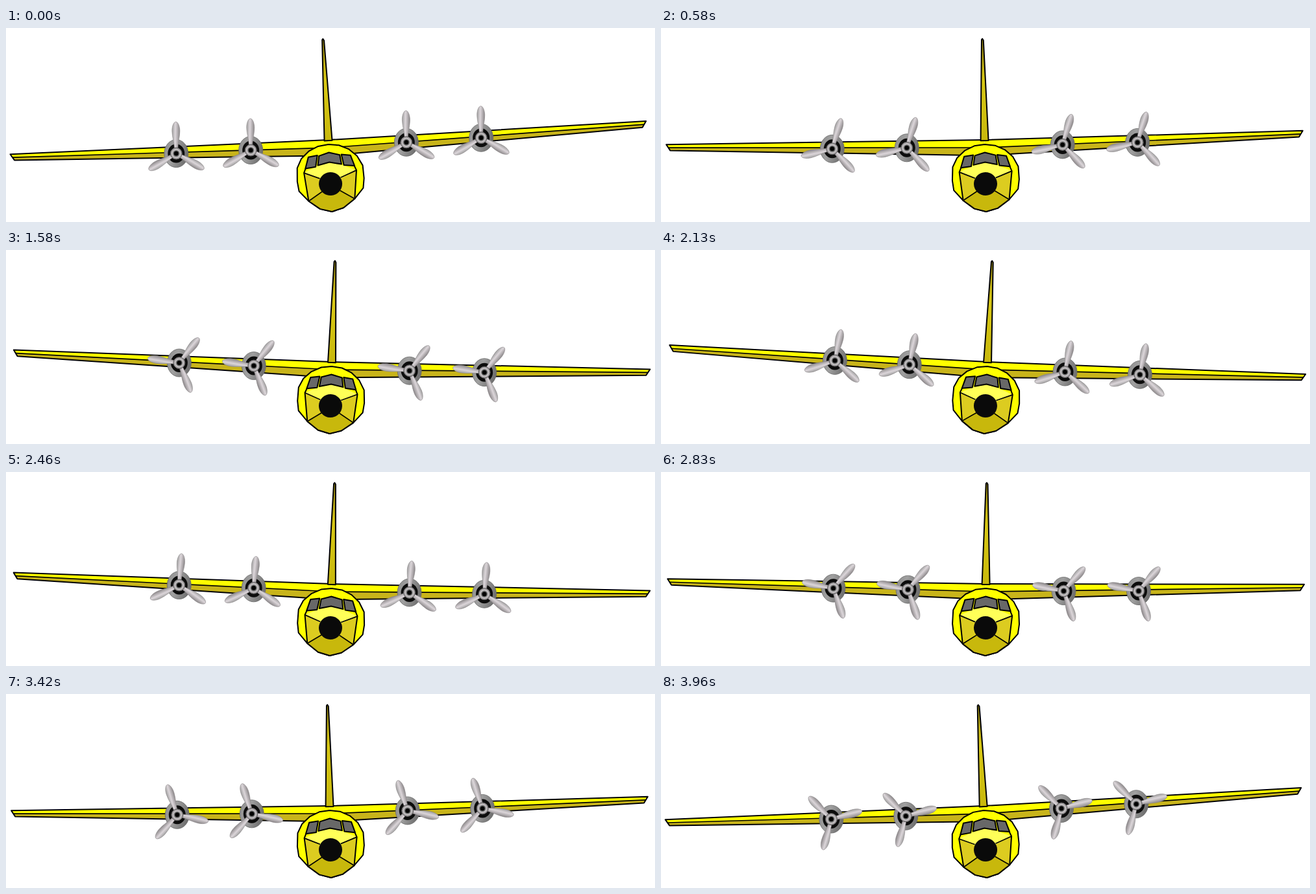
An HTML page that plays this animation: 1000x300 px, repeating every 4 s.

```html
<!DOCTYPE html>
<html lang="en">
<head>
<meta charset="utf-8">
<title>Rocking propeller plane</title>
<style>
  html, body { margin: 0; width: 100%; height: 100%; overflow: hidden; background: #fff; }
  svg { display: block; width: 100%; height: 100%; }
  .ink { stroke: #000; stroke-width: 2; stroke-linejoin: round; }
  .line { fill: none; stroke: #000; stroke-width: 1.7; }
</style>
</head>
<body>
<svg viewBox="0 0 1000 300">
  <defs>
    <linearGradient id="steel" x1="0" x2="1" y1="0" y2="0.3">
      <stop offset="0" stop-color="#8c8c8c"/>
      <stop offset="0.45" stop-color="#a0a0a0"/>
      <stop offset="1" stop-color="#727272"/>
    </linearGradient>
    <linearGradient id="metal" x1="0" x2="1" y1="0" y2="0.1">
      <stop offset="0" stop-color="#9c9c9c"/>
      <stop offset="0.45" stop-color="#dcd6da"/>
      <stop offset="1" stop-color="#8e8a8c"/>
    </linearGradient>
    <linearGradient id="finFill" x1="0" x2="0" y1="0" y2="1">
      <stop offset="0" stop-color="#9c8c10"/>
      <stop offset="0.4" stop-color="#d8c814"/>
      <stop offset="1" stop-color="#c8b80c"/>
    </linearGradient>

    <path id="blade" fill="url(#metal)" stroke="#8a8688" stroke-width="0.6"
          d="M-2.5-5C-2.5-16-6-25-6-35C-6-43-3-49 0-49C3-49 6-43 6-35C6-25 2.5-16 2.5-5Z"/>

    <g id="engine">
      <ellipse rx="18.5" ry="21.5" fill="url(#steel)" stroke="#666" stroke-width="0.8"/>
      <ellipse rx="13" ry="14.5" fill="#0c0c0c"/>
      <g id="prop">
        <use href="#blade"/>
        <use href="#blade" transform="rotate(120)"/>
        <use href="#blade" transform="rotate(240)"/>
      </g>
      <circle r="9" fill="#a8a4a6" stroke="#555" stroke-width="1"/>
      <circle r="6" fill="#777" stroke="#d4d0d2" stroke-width="1.2"/>
      <circle r="3.5" fill="#000"/>
    </g>

    <g id="wing">
      <path fill="#ffff00" d="M0 173L490.5 169.5L487 174.5L0 185Z"/>
      <path fill="#c8b41a" d="M0 185L487 174.5L484.5 179L45 195.5L0 198Z"/>
      <path class="line" d="M0 185L487 174.5"/>
      <path class="ink" fill="none" d="M0 173L490.5 169.5L484.5 179L45 195.5L0 198"/>
    </g>
  </defs>

  <g id="plane">
    <use href="#wing" transform="translate(500)"/>
    <use href="#wing" transform="translate(500) scale(-1 1)"/>
    <path class="ink" fill="url(#finFill)" d="M494 174L498.8 18L500 16.5L501.6 19L506 174Z"/>

    <path class="ink" fill="#ffff00"
          d="M500 180L516 182L531 189L543 200L551 215L552 235L550 250L536 266L518 279L500 284L482 279L465 266L451 250L449 235L450 214L457 200L469 189L484 182Z"/>
    <path fill="#c8b80c" d="M465 266L500 241L536 266L518 279L500 284L482 279Z"/>
    <path fill="#dccc20" d="M460 222L500 241L465 266ZM541 222L500 241L536 266Z"/>
    <path fill="#ffff58" d="M460 222L480 213L500 208L520 213L541 222L500 241Z"/>
    <path class="ink" fill="none"
          d="M463 215L460 222L465 266L482 279L500 284L518 279L536 266L541 222L538 215"/>
    <path class="line" d="M460 222L484 232M541 222L516 232M465 266L487 252M536 266L514 252"/>
    <g class="ink" fill="#686868">
      <path d="M468 198L482 196L478.5 213.5L462.5 215.5Z"/>
      <path d="M484.5 197L500 192.5L516.5 197L518.5 211.5L500 207.5L482 211.5Z"/>
      <path d="M519 196.5L533 198.5L538.5 215L522 213Z"/>
    </g>
    <circle cx="500" cy="241" r="18" fill="#0a0a0a"/>
  </g>
  <g id="engines">
    <use href="#engine"/><use href="#engine"/><use href="#engine"/><use href="#engine"/>
  </g>
</svg>
<script>
  const LOOP = 4000, FRAMES = 96, SWING = 3, STEP = 44.1;
  const PIVOT = { x: 500, y: 240 };
  const mounts = [[-235, -58.3], [-120, -57.3], [120, -57], [235.5, -58]];
  const plane = document.getElementById('plane');
  const prop = document.getElementById('prop');
  const engines = [...document.getElementById('engines').children];

  // The picture advances 24 times a second, on a 10 ms clock.
  function frameAt(ms) {
    const tick = Math.floor((ms % LOOP) / 10) * 10;
    return Math.floor((tick + 4.9) * FRAMES / LOOP);
  }

  function draw(ms) {
    const k = frameAt(ms);
    const tilt = SWING - 2 * SWING * Math.abs(1 - 2 * k / FRAMES);
    const rad = tilt * Math.PI / 180;
    const c = Math.cos(rad), s = Math.sin(rad);

    // The propellers restart halfway through each half loop.
    const turn = (k + 24) % 48 - 24;
    const spin = (STEP * turn - 0.7) % 360;

    plane.setAttribute('transform', `rotate(${tilt} ${PIVOT.x} ${PIVOT.y})`);
    prop.setAttribute('transform', `rotate(${spin})`);
    // Engines follow the wing but stay upright.
    mounts.forEach(([x, y], i) => engines[i].setAttribute('transform',
      `translate(${PIVOT.x + x * c - y * s} ${PIVOT.y + x * s + y * c})`));
  }

  const start = performance.now();
  function loop() {
    draw(performance.now() - start);
    requestAnimationFrame(loop);
  }
  draw(0);
  requestAnimationFrame(loop);
</script>
</body>
</html>
```
